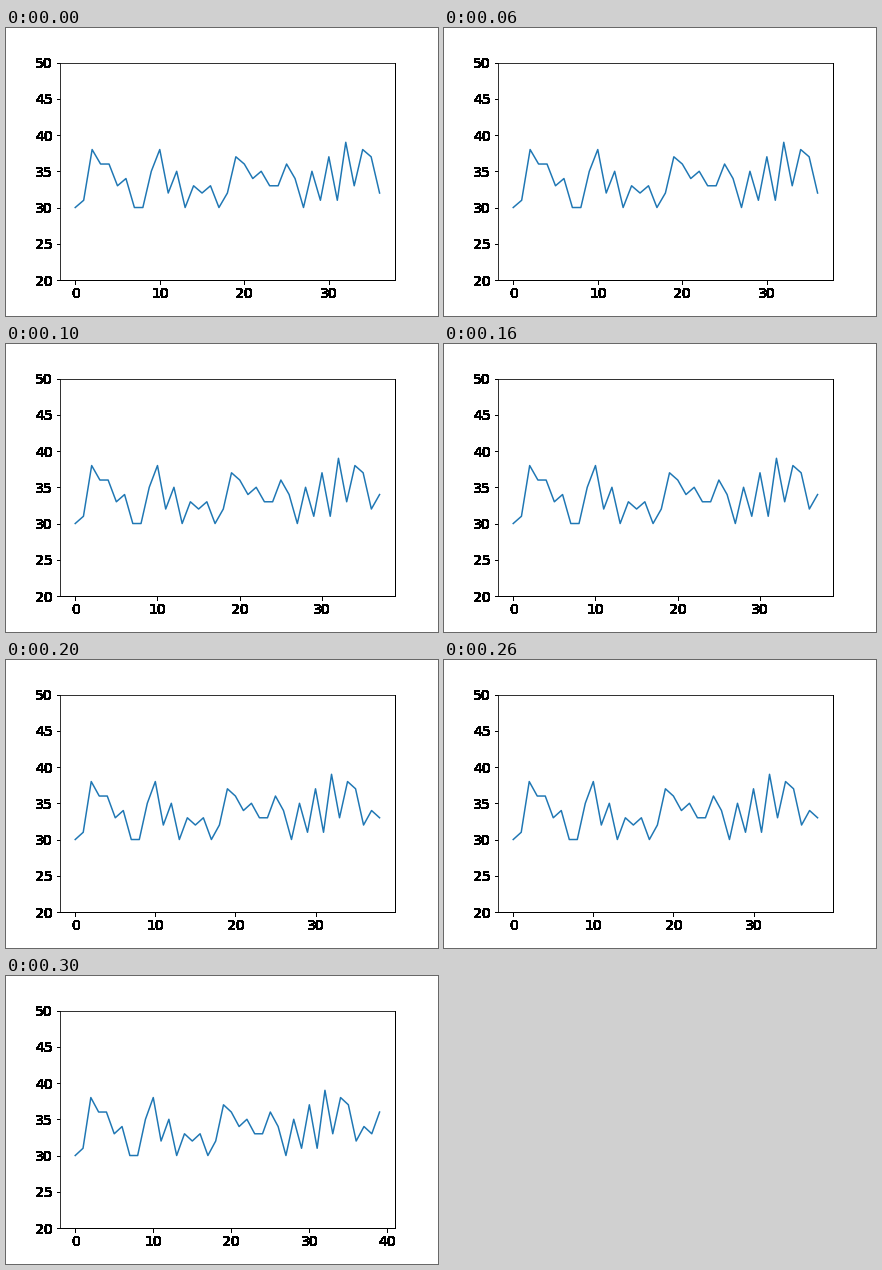
A matplotlib script for the animation above (400 ms loop, 432 by 288 pixels).

```python
import matplotlib.pyplot as plt
import numpy as np
from matplotlib.animation import FuncAnimation
from matplotlib.ticker import MultipleLocator

plt.rcParams.update({"font.family": "DejaVu Sans", "font.size": 14})

VALUES = [30, 31, 38, 36, 36, 33, 34, 30, 30, 35,
          38, 32, 35, 30, 33, 32, 33, 30, 32, 37,
          36, 34, 35, 33, 33, 36, 34, 30, 35, 31,
          37, 31, 39, 33, 38, 37, 32, 34, 33, 36]
FRAMES = 4
START = len(VALUES) - FRAMES + 1  # points visible at the start of a loop
MARGIN = 0.05


def solid_alpha(image, dpi):
    """Make every touched pixel opaque, giving hard-edged labels and ticks."""
    rgba = np.rint(image * 255).astype(np.uint8)
    rgba[..., 3] = np.where(rgba[..., 3] > 0, 255, 0)
    return rgba, 0, 0


fig = plt.figure(figsize=(6, 4), dpi=72, facecolor="white")
fig.subplots_adjust(left=0.125, right=0.9, bottom=0.125, top=0.88)
ax = fig.add_subplot()
ax.set_agg_filter(solid_alpha)
ax.set_ylim(20, 50)
ax.xaxis.set_major_locator(MultipleLocator(10))
ax.yaxis.set_major_locator(MultipleLocator(5))
line, = ax.plot([], [], color="tab:blue", lw=1.5)


def update(i):
    count = START + i
    last = count - 1
    line.set_data(range(count), VALUES[:count])
    ax.set_xlim(-MARGIN * last, (1 + MARGIN) * last)
    return line,


anim = FuncAnimation(fig, update, frames=FRAMES, interval=100,
                     init_func=lambda: update(0), repeat=True, repeat_delay=0)
plt.show()
```
